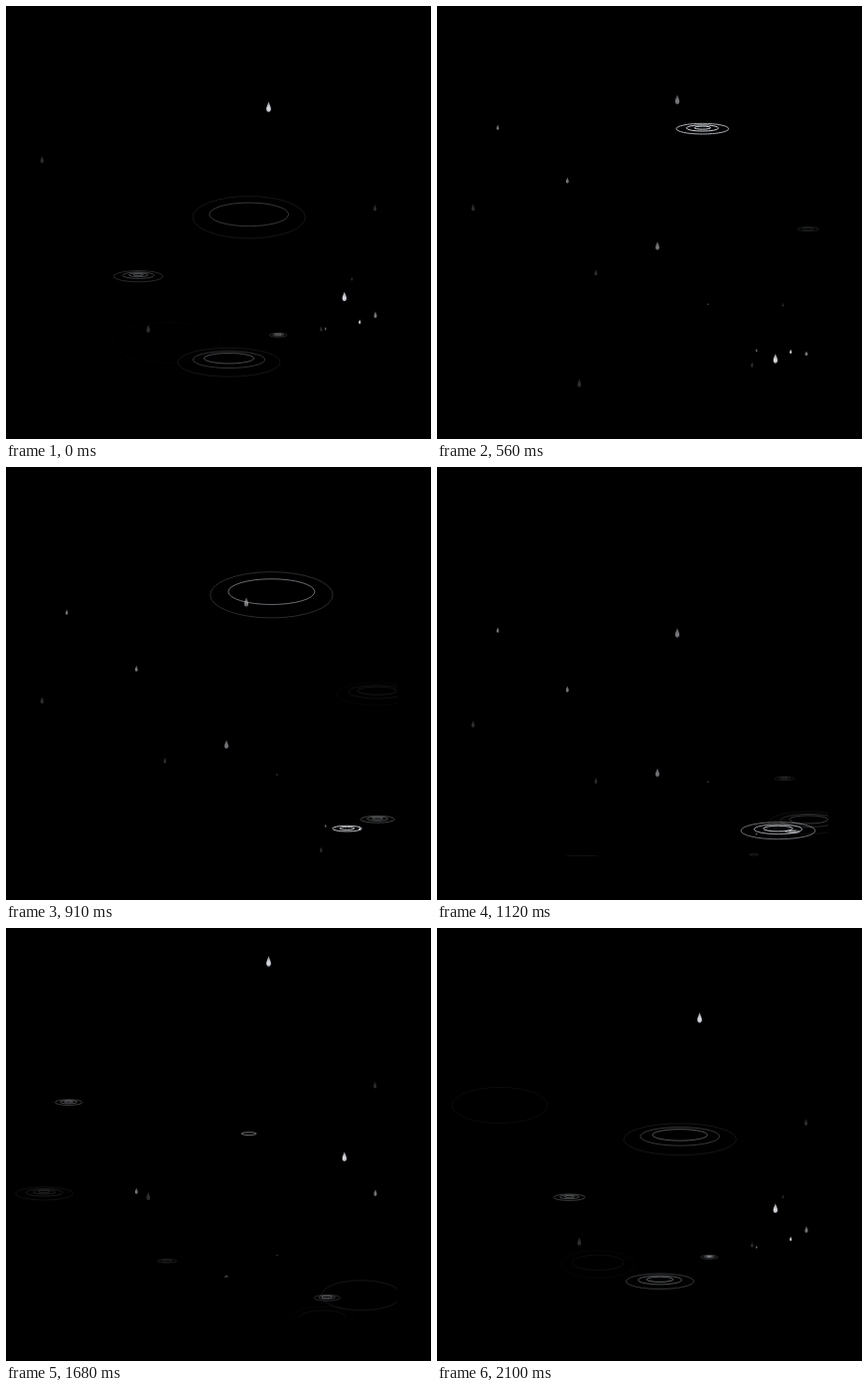
An HTML page with a canvas that plays this animation: 428x436 px, repeating every 2170 ms.

```html
<!DOCTYPE html>
<html lang="en">
<head>
<meta charset="utf-8">
<title>Rain</title>
<style>
  html, body { margin: 0; width: 100%; height: 100%; overflow: hidden; background: #000; }
  canvas { display: block; }
</style>
</head>
<body>
<canvas id="stage" width="428" height="436"></canvas>
<script>
const ctx = document.getElementById('stage').getContext('2d');

const TICK = 70, TICKS = 31, STEPS = 25, FALL = 14, SPEED = 10.4, LIFE = 10;
const HELD = [2, 6, 11, 18, 22, 27]; // ticks that repeat the pose before them

// Each drop: x, ground y, scale, landing step
const LAYERS = [
  { light: 1, drops: [
    [264.5, 122.5, 1.09, 2], [340.8, 363.7, 1, 7], [356.2, 367, 0.48, 10]
  ] },
  { light: 0.55, drops: [
    [242, 207, 1, 17], [222, 353.5, 0.91, 18], [131.3, 270.5, 0.66, 20], [372, 354, 0.71, 6],
    [61.2, 175, 0.575, 15], [321.8, 371.5, 0.35, 13], [273, 330.8, 0.23, 19]
  ] },
  { light: 0.21, drops: [
    [36.3, 265.5, 0.77, 14], [371.6, 224.3, 0.72, 3], [143.3, 396.5, 0.88, 8],
    [317.3, 390.3, 0.58, 11], [160, 335, 0.65, 16], [348.3, 313.3, 0.42, 9]
  ] }
];

const gray = a => `rgba(230,234,240,${a})`;

function drop(x, y, s, light, squash = 1) {
  ctx.save();
  ctx.translate(x, y);
  ctx.scale(s, s * squash);
  const fill = ctx.createLinearGradient(0, -5, 0, 5);
  fill.addColorStop(0, gray(light * 0.6));
  fill.addColorStop(0.65, gray(light * 0.95));
  fill.addColorStop(1, gray(light * 0.75));
  ctx.fillStyle = fill;
  ctx.beginPath();
  ctx.moveTo(0, -5);
  ctx.bezierCurveTo(0.6, -2.6, 2.1, -0.8, 2.1, 2);
  ctx.bezierCurveTo(2.1, 5.5, -2.1, 5.5, -2.1, 2);
  ctx.bezierCurveTo(-2.1, -0.8, -0.6, -2.6, 0, -5);
  ctx.fill();
  ctx.restore();
}

// Rings spread from the middle; the outer ones grow faster, open up and fade.
function ripple(x, y, s, light, age) {
  const late = age > 6;
  const lead = Math.min(age - 2, Math.floor((age + 1) / 2));
  const count = Math.min(age - 1, Math.ceil(0.75 * (LIFE - age)));
  ctx.lineWidth = Math.max(0.55, 0.85 * s);
  for (let i = 0; i < count; i++) {
    const j = lead - i * (late ? 0.85 : 1);
    const rx = 7.5 + 7 * j + 0.33 * j ** 3;
    const open = age > 7 ? 7e-5 : 3e-5;
    const ry = rx * Math.min(0.375, 0.185 + open * rx * rx);
    const sink = Math.min(6, 0.0018 * rx * rx);
    ctx.strokeStyle = gray(light * Math.max(0.16, 1 - 0.05 * j * j));
    ctx.beginPath();
    ctx.ellipse(x + 0.8 + 1.9 * s, y + sink * s, rx * s, ry * s, 0, 0, Math.PI * 2);
    ctx.stroke();
  }
}

function drawDrop(step, light, [x, y, s, land]) {
  const age = (step - land + FALL + STEPS) % STEPS - FALL;
  if (age < 0) drop(x, y + s * (1.7 + SPEED * age), s, light);
  else if (age < 2) drop(x, y - s * (age ? 3 : 5.8), s, light, age ? 0.15 : 0.65);
  else if (age < LIFE) ripple(x, y, s, light, age);
}

function draw(step) {
  ctx.clearRect(0, 0, 428, 436);
  ctx.save();
  ctx.beginPath();
  ctx.rect(0, 0, 394, 392);
  ctx.clip();
  for (const { light, drops } of LAYERS) {
    for (const d of drops) drawDrop(step, light, d);
  }
  ctx.restore();
}

const start = performance.now();
function frame() {
  const tick = Math.floor((performance.now() - start) / TICK) % TICKS;
  draw(tick - HELD.filter(h => h <= tick).length);
  requestAnimationFrame(frame);
}
frame();
</script>
</body>
</html>
```
